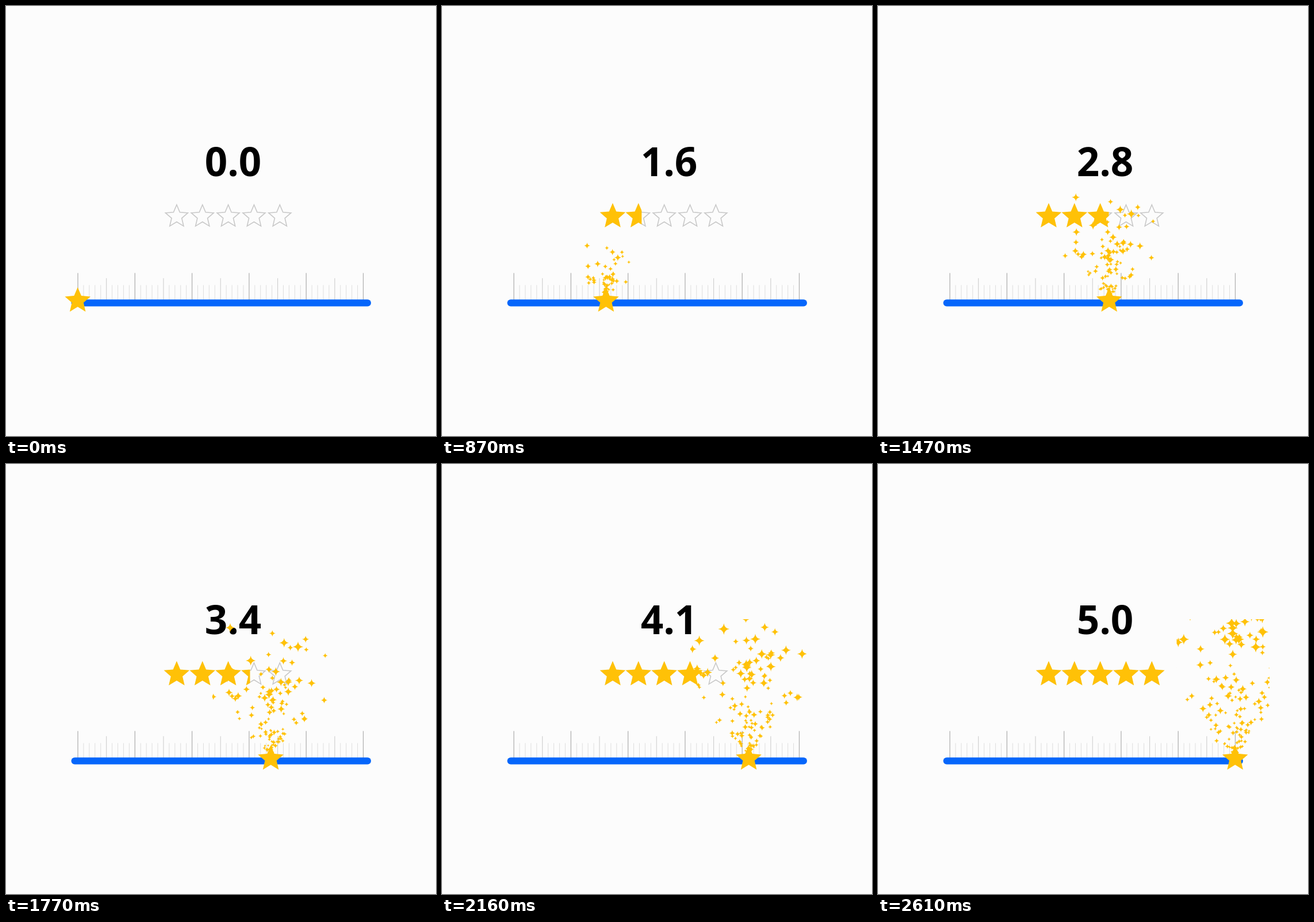
Write an HTML page that moves like this. It is 748 px wide and 748 px high and loops after 2.67 s.

```html
<!DOCTYPE html>
<html lang="en">
<head>
<meta charset="utf-8">
<title>Rating slider</title>
<style>
  html, body { margin: 0; width: 100%; height: 100%; overflow: hidden; background: #fcfcfc; }
  svg { display: block; width: 748px; height: 748px; }
  #value { font: 700 69px "Open Sans", "Noto Sans", sans-serif; text-anchor: middle; }
  .gold { fill: #ffc107; }
  .outline { fill: none; stroke: #c9c9c9; stroke-width: .85; }
</style>
</head>
<body>
<svg viewBox="0 0 748 748">
  <defs>
    <!-- five-pointed star, top tip at the origin, 20 units wide -->
    <path id="star" d="M0 15.27 6.18 19 4.54 11.97 10 7.24 2.81 6.63 0 0-2.81 6.63-10 7.24-4.54 11.97-6.18 19z"/>
    <clipPath id="plume"><rect id="plumeBox" y="270" height="250"/></clipPath>
  </defs>
  <text id="value" x="395" y="296">0.0</text>
  <g id="rating"></g>
  <g id="ruler"></g>
  <rect x="113.5" y="510.5" width="521.5" height="12" rx="6" fill="#0566fb"/>
  <g clip-path="url(#plume)"><path id="sparks" class="gold"/></g>
  <use id="thumb" href="#star" class="gold"/>
</svg>
<script>
const LOOP = 2670, STEPS = 34, STEP_MS = 75;
const LEFT = 125, WIDTH = 496.5, STARS = 5;
const BASE_Y = 504, SPARK_GAP = 15;
const $ = id => document.getElementById(id);

function add(parent, tag, attrs) {
  const el = document.createElementNS("http://www.w3.org/2000/svg", tag);
  for (const key in attrs) el.setAttribute(key, attrs[key]);
  return parent.appendChild(el);
}

function random(seed) {
  return () => {
    seed = (seed * 1664525 + 1013904223) >>> 0;
    return seed / 4294967296;
  };
}

// Rating row: each gold star is revealed from the left by its own clip
const fills = [];
for (let i = 0; i < STARS; i++) {
  const cx = 296.9 + i * 44.85;
  add($("rating"), "use", { href: "#star", class: "outline", transform: `translate(${cx} 345.8) scale(1.95)` });
  const clip = add(document.querySelector("defs"), "clipPath", { id: "fill" + i });
  fills.push(add(clip, "rect", { x: cx - 27.2, y: 335, width: 0, height: 60 }));
  const group = add($("rating"), "g", { "clip-path": `url(#fill${i})` });
  add(group, "use", { href: "#star", class: "gold", transform: `translate(${cx} 342.7) scale(2.23)` });
}

// Ruler with ten ticks per unit
for (let i = 0; i <= STARS * 10; i++) {
  const [top, color, width] = i % 10 === 0 ? [464.5, "#b2b2b2", 1.3]
    : i % 5 === 0 ? [473.5, "#cecece", 1.1] : [485.5, "#dedede", 1];
  const x = LEFT + i * WIDTH / 50;
  add($("ruler"), "path", { d: `M${x} ${top}V511`, stroke: color, "stroke-width": width });
}

const rnd = random(29);
const sparks = Array.from({ length: STEPS * STEP_MS / SPARK_GAP }, (_, i) => ({
  born: i * SPARK_GAP,
  vx: (rnd() + rnd() - 1) * .085,
  vy: .03 + rnd() * .065,
  size: .45 + rnd() * .55
}));

function sparkPath(x, y, r) {
  const c = r * .12;
  const p = (dx, dy) => `${(x + dx).toFixed(1)} ${(y + dy).toFixed(1)}`;
  return `M${p(0, -r)}Q${p(c, -c)} ${p(r, 0)}Q${p(c, c)} ${p(0, r)}`
    + `Q${p(-c, c)} ${p(-r, 0)}Q${p(-c, -c)} ${p(0, -r)}z`;
}

function draw(step) {
  const x = LEFT + WIDTH * step / STEPS;
  const value = STARS * step / STEPS;
  const time = step * STEP_MS;

  $("value").textContent = value.toFixed(1);
  fills.forEach((rect, i) => {
    rect.setAttribute("width", 53 * Math.min(1, Math.max(0, value - i)) + (value >= i + 1 ? 2 : 0));
  });
  $("thumb").setAttribute("transform", `translate(${x - .3} 489.3) scale(2.23)`);

  // The plume travels with the thumb
  const left = x - 102, right = Math.min(x + 100, 681);
  $("plumeBox").setAttribute("x", left);
  $("plumeBox").setAttribute("width", right - left);
  let d = "";
  for (const s of sparks) {
    const age = time - s.born;
    if (age <= 0) continue;
    const rise = s.vy * age + 2.2e-5 * age * age;
    if (rise > 250) continue;
    d += sparkPath(x + s.vx * age, BASE_Y - rise, s.size * (4.6 + rise * .026));
  }
  $("sparks").setAttribute("d", d);
}

let shown = -1;
const start = performance.now();
function frame() {
  const t = (performance.now() - start) % LOOP;
  const tick = Math.floor(t / 30) * 30;
  const step = Math.min(STEPS, Math.max(0, Math.floor((tick - 45) / STEP_MS)));
  if (step !== shown) draw(shown = step);
  requestAnimationFrame(frame);
}
frame();
</script>
</body>
</html>
```
